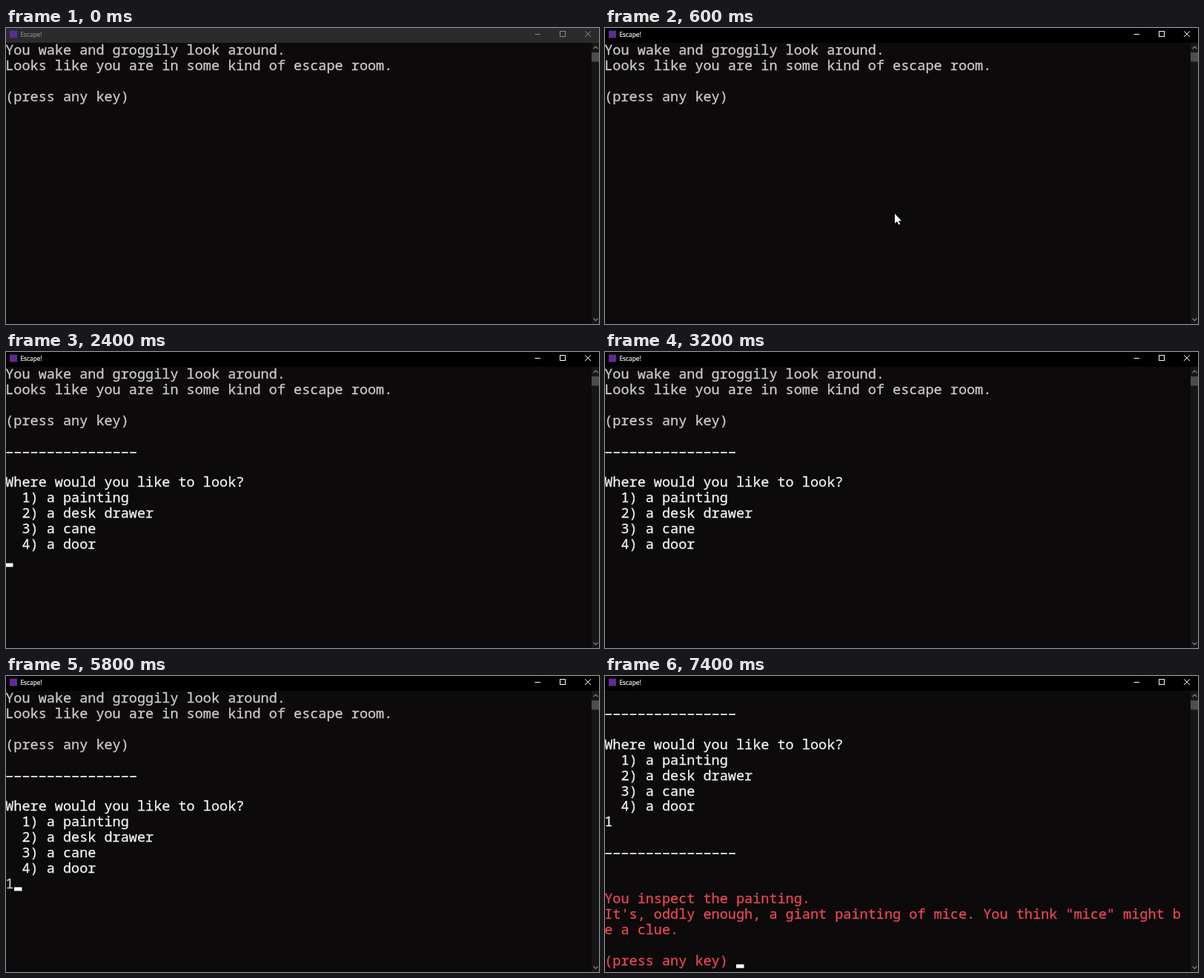
These frames come from a looping animation (800 px wide and 400 px high, 8000 ms). An HTML page with a canvas:

```html
<!DOCTYPE html>
<html lang="en">
<head>
<meta charset="utf-8">
<title>Escape!</title>
<style>
  html, body { margin: 0; width: 100%; height: 100%; overflow: hidden; background: #0c0a0b; }
  canvas { display: block; }
</style>
</head>
<body>
<canvas width="800" height="400"></canvas>
<script>
const ctx = document.querySelector('canvas').getContext('2d');
const LOOP = 8000, COL = 11.12, ROW = 20.85;
const GREY = '#cccac8', WHITE = '#f2f2f2', RED = '#e74856';
const RULE = '-'.repeat(16);

const intro = [
  'You wake and groggily look around.',
  'Looks like you are in some kind of escape room.',
  '',
  '(press any key)'
];
const menu = [
  RULE,
  '',
  'Where would you like to look?',
  '  1) a painting',
  '  2) a desk drawer',
  '  3) a cane',
  '  4) a door'
];
const result = [
  'You inspect the painting.',
  'It\'s, oddly enough, a giant painting of mice. You think "mice" might b',
  'e a clue.',
  '',
  '(press any key)'
];

function rect(x, y, w, h, color) {
  ctx.fillStyle = color;
  ctx.fillRect(x, y, w, h);
}

function line(color, width, ...points) {
  ctx.strokeStyle = color;
  ctx.lineWidth = width;
  ctx.beginPath();
  points.forEach(([x, y]) => ctx.lineTo(x, y));
  ctx.stroke();
}

// A hairline stroke gives the letters a slightly heavier weight.
function label(text, x, y, color, weight) {
  ctx.fillStyle = ctx.strokeStyle = color;
  ctx.lineWidth = weight;
  ctx.fillText(text, x, y);
  ctx.strokeText(text, x, y);
}

function print(lines, row, color) {
  ctx.font = '18.53px "Noto Sans Mono", monospace';
  lines.forEach((text, i) => {
    const y = 36.4 + (row + i) * ROW;
    if (text === RULE) {
      for (let c = 0; c < RULE.length; c++) rect(0.4 + c * COL, Math.round(y - 6), 8.6, 1.7, color);
    } else {
      label(text, -0.8, y, color, 0.3);
    }
  });
}

function caret(col, row) {
  rect(Math.round(col * COL - 0.6), 35.2 + row * ROW, 10.5, 5, '#fff');
}

function titleBar(active) {
  const color = active ? '#fff' : '#8c8c8c';
  rect(0, 0, 800, 20, active ? '#000' : '#2b2b2b');
  rect(5, 3.5, 10, 10, '#5c2d91');
  ctx.font = '8.3px "Open Sans", sans-serif';
  label('Escape!', 19.5, 11.7, color, 0.2);
  line(color, 1, [713.5, 8.5], [721, 8.5]);
  ctx.strokeRect(747.5, 4.5, 7, 7);
  line(color, 1, [781, 4.3], [789, 12]);
  line(color, 1, [789, 4.3], [781, 12]);
}

function scrollBar() {
  rect(790, 20, 10, 380, '#171717');
  rect(790, 33, 10, 12.5, '#4d4d4d');
  line('#858585', 1.2, [792.5, 28], [795.5, 25], [798.5, 28]);
  line('#858585', 1.2, [792.5, 392.5], [795.5, 395.5], [798.5, 392.5]);
}

function pointer(x, y) {
  ctx.fillStyle = '#fff';
  ctx.fill(new Path2D(`M${x} ${y}v13l3-2.8 2.2 4.6 1.9-.9-2.1-4.4h4z`));
}

function draw(t) {
  rect(0, 0, 800, 400, '#0c0a0b');
  const blinkOn = Math.floor(t / 600) % 2 === 0;
  if (t < 6000) {
    print(intro, 0, GREY);
    if (t >= 1200) {
      const typed = t >= 5000;
      print(menu, 5, WHITE);
      if (typed) print(['1'], 12, GREY);
      if (blinkOn || t >= 5800) caret(typed ? 1 : 0, 12);
    }
  } else {
    print(menu, 1, WHITE);
    print(['1'], 8, WHITE);
    print([RULE], 10, WHITE);
    print(result, 13, RED);
    if (t < 6800 || t >= 7400) caret(16, 17);
  }
  titleBar(t >= 400);
  scrollBar();
  if (t >= 200 && t < 1200) pointer(391, 251);
}

function tick() {
  draw(performance.now() % LOOP);
  requestAnimationFrame(tick);
}
tick();
</script>
</body>
</html>
```
